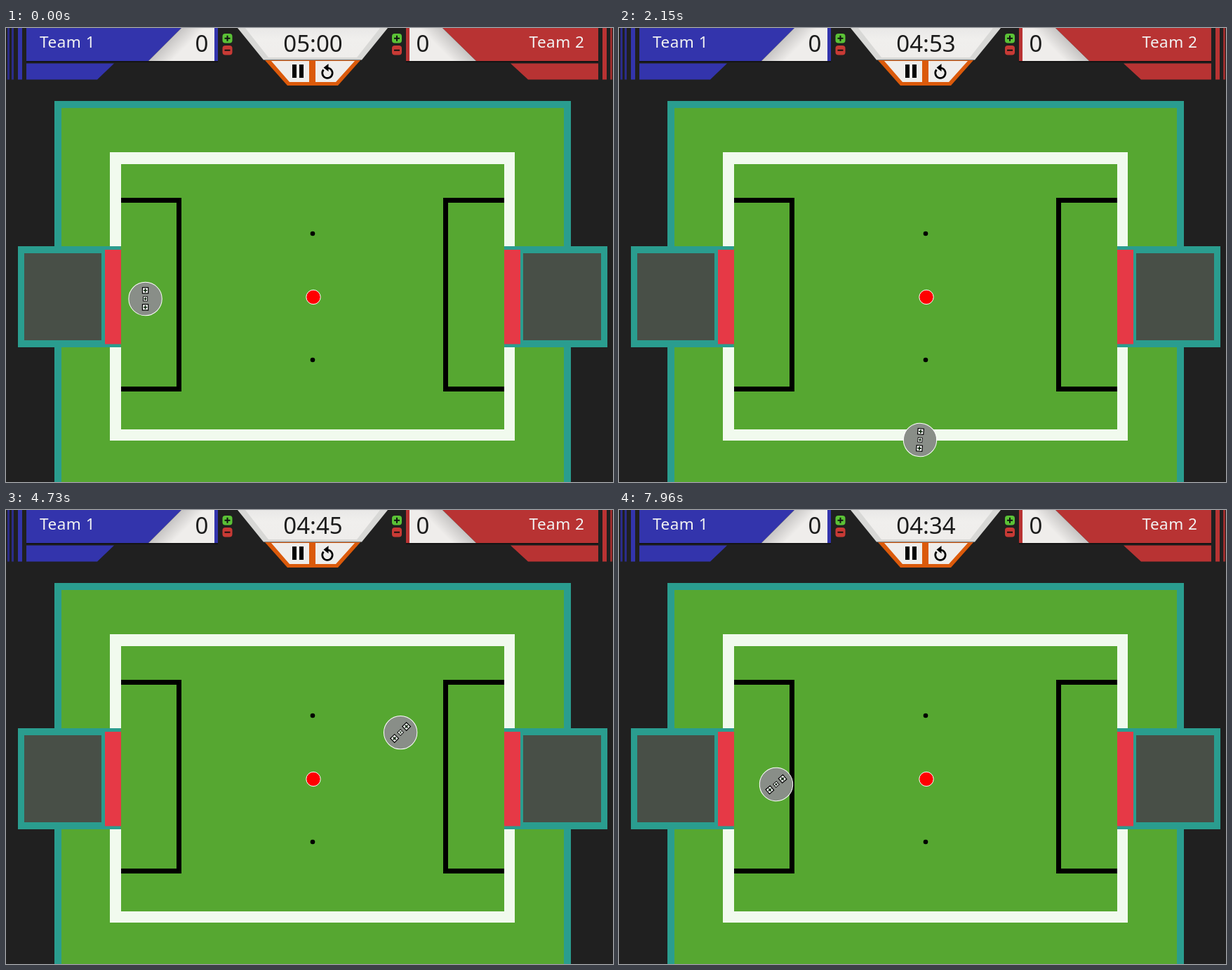
Recreate the animation shown at these times as an HTML page. Size 865 by 647 pixels, loop 7990 ms.

```html
<!DOCTYPE html>
<html lang="en">
<head>
<meta charset="utf-8">
<title>Robot soccer</title>
<style>
  html, body { margin: 0; width: 100%; height: 100%; overflow: hidden; background: #202020; }
  svg { display: block; width: 865px; height: 647px; }
  text { font-family: "Noto Sans", "Open Sans", sans-serif; }
  .team { font-size: 22.5px; font-weight: 500; letter-spacing: .5px; fill: #f2f2f2; }
  .digits { font-size: 33px; fill: #1c1c1c; text-anchor: middle; }
</style>
</head>
<body>
<svg viewBox="0 0 865 647">
  <defs>
    <linearGradient id="panel" x2="0" y2="1">
      <stop offset="0" stop-color="#e9e8e7"/><stop offset=".4" stop-color="#f0efed"/><stop offset="1" stop-color="#efedeb"/>
    </linearGradient>
    <linearGradient id="shadeLeft" gradientUnits="userSpaceOnUse" x1="226" y1="23" x2="243" y2="40">
      <stop stop-color="#c5c3c2"/><stop offset="1" stop-color="#efedeb"/>
    </linearGradient>
    <linearGradient id="shadeRight" gradientUnits="userSpaceOnUse" x1="646" y1="23" x2="629" y2="40">
      <stop stop-color="#c5c3c2"/><stop offset="1" stop-color="#efedeb"/>
    </linearGradient>
    <g id="buttons">
      <rect y="8" width="14" height="13.5" rx="4" fill="#5bc236"/>
      <path d="M3 14.7h8M7 10.7v8" stroke="#111" stroke-width="2"/>
      <rect y="25" width="14" height="13.5" rx="4" fill="#c83a35"/>
      <path d="M3 31.7h8" stroke="#111" stroke-width="2"/>
    </g>
    <g id="marker">
      <rect x="-4.7" y="-4.7" width="9.4" height="9.4" fill="#000"/>
      <rect x="-3.5" y="-3.5" width="7" height="7" fill="#fff"/>
      <path d="M-2.7 0h5.4M0-2.7v5.4" stroke="#0a240a" stroke-width="1.7"/>
    </g>
  </defs>

  <!-- Pitch -->
  <path fill="#2a9d8f" d="M69 104H805V647H69z"/>
  <path fill="#56a731" d="M79 114H795V647H79z"/>
  <path fill="#f1faee" fill-rule="evenodd" d="M148 177H725V588H148zM164 194V572H710V194z"/>
  <path fill="#2a9d8f" d="M17 311H164V455H17zM710 311H857V455H710z"/>
  <path fill="#56a731" d="M163.500 311H164V455H163.500z"/>
  <path fill="#484f47" d="M26 321H136V445H26zM737 321H848V445H737z"/>
  <path fill="#e63946" d="M141 316H164V450.500H141zM710 316H733V450.500H710z"/>
  <path fill="none" stroke="#000" stroke-width="7" d="M164 245.500H246.500V514.500H164M710 245.500H626.500V514.500H710"/>
  <circle cx="437" cy="293" r="3.3"/>
  <circle cx="437" cy="473" r="3.3"/>
  <circle cx="438" cy="383.500" r="10.200" fill="#f00" stroke="#fff"/>

  <!-- Left team -->
  <path fill="#3334ac" d="M29 0H250L203 47H29zM29 50.500H154L130 73.500H29zM17 0H23V73.500H17z"/>
  <path fill="#2b2c88" d="M2 0H5V73.500H2zM8 0H11V73.500H8z"/>
  <path fill="url(#shadeLeft)" d="M250 0H297V47H203z"/>
  <path fill="#3334ac" d="M297 0H302V47H297z"/>
  <path stroke="#111" stroke-width="1.500" d="M29 48H302"/>
  <text class="team" x="48" y="28">Team 1</text>
  <text class="digits" x="279" y="34">0</text>
  <use href="#buttons" x="308.500"/>

  <!-- Right team -->
  <path fill="#b83333" d="M622 0H844V47H670zM719 50.500H844V73.500H744zM850 0H856V73.500H850z"/>
  <path fill="#9a2d2d" d="M861 0H864V73.500H861z"/>
  <path fill="url(#shadeRight)" d="M575 0H622L670 47H575z"/>
  <path fill="#b83333" d="M570 0H575V47H570z"/>
  <path stroke="#111" stroke-width="1.500" d="M570 48H844"/>
  <text class="team" x="824.500" y="28" text-anchor="end">Team 2</text>
  <text class="digits" x="594" y="34">0</text>
  <use href="#buttons" x="550"/>

  <!-- Clock and controls -->
  <path fill="#d8d8d6" d="M330 0H544L507 45.500H367z"/>
  <path fill="url(#panel)" d="M341 0H533L500 42H374z"/>
  <path fill="#db5a0b" d="M369 46H505L473 82H401z"/>
  <path fill="#efedeb" d="M378 47H432V77H404zM441 47H497L470 77H441z"/>
  <path d="M408 52H414V71H408zM418 52H424V71H418z"/>
  <path fill="none" stroke="#000" stroke-width="2.700" d="M452.500 59.500A7.200 7.200 0 1 0 458 57"/>
  <path d="M459.500 51V62L452.500 56.500z"/>
  <text class="digits" id="clock" x="437.500" y="34"></text>

  <g id="robot">
    <circle r="23.700" fill="#898e88" stroke="#fff"/>
    <use href="#marker" y="-12"/>
    <use href="#marker" transform="scale(.75)"/>
    <use href="#marker" y="12"/>
  </g>
</svg>
<script>
  const LOOP = 7990;
  const clock = document.getElementById("clock");
  const robot = document.getElementById("robot");

  // Time, x, y, heading in degrees: drive a side, turn on the spot, drive on.
  const route = [
    [890, 240, 403, 45],
    [1762, 429, 587, 45],
    [2630, 429, 587, -45],
    [3560, 629, 381.500, -45],
    [4421, 629, 381.500, -135],
    [5381, 422, 182, -135],
    [6245, 422, 182, -226],
    [7191, 224, 391, -226],
    [8000, 224, 391, -315]
  ];

  function pose(t) {
    if (t < route[0][0]) {
      const angle = 45 * Math.min(t / 820, 1);
      const rad = angle * Math.PI / 180;
      return [198.500 + 59 * Math.sin(rad), 386 + 59 * (1 - Math.cos(rad)), angle];
    }
    const i = route.findIndex(stop => stop[0] > t);
    const [start, ...from] = route[i - 1];
    const [end, ...to] = route[i];
    const k = (t - start) / (end - start);
    return from.map((v, n) => v + (to[n] - v) * k);
  }

  function draw(now) {
    const t = now % LOOP;
    const seconds = Math.floor(300.45 - 3.23 * t / 1000);
    const pad = n => String(n).padStart(2, "0");
    clock.textContent = pad(Math.floor(seconds / 60)) + ":" + pad(seconds % 60);
    const [x, y, angle] = pose(t);
    robot.setAttribute("transform", `translate(${x} ${y}) rotate(${angle})`);
  }

  const began = performance.now();
  function tick() {
    draw(performance.now() - began);
    requestAnimationFrame(tick);
  }
  tick();
</script>
</body>
</html>
```
